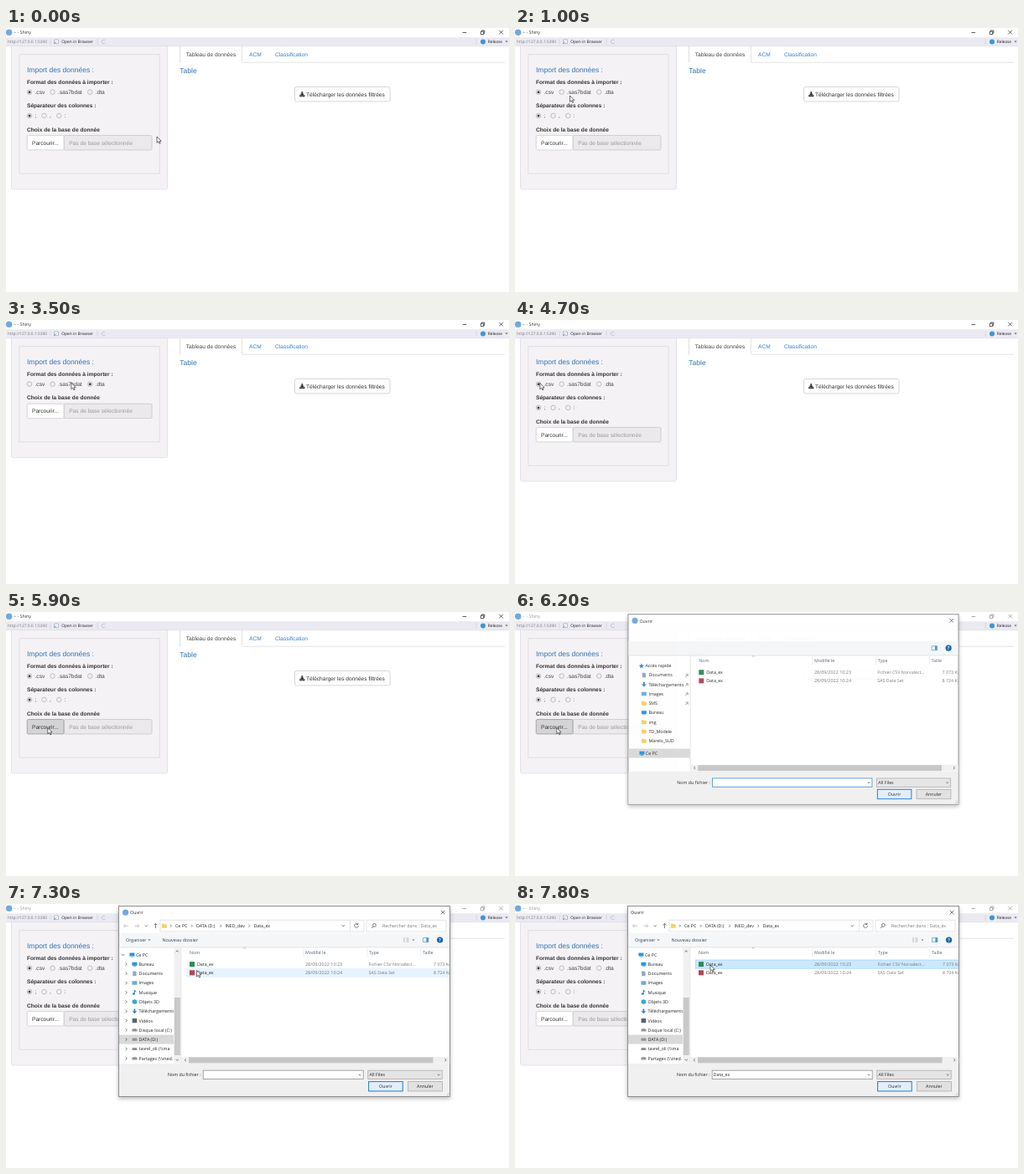
These frames come from a looping animation (600x316 px, 8000 ms). An HTML page:

```html
<!DOCTYPE html>
<html lang="fr">
<head>
<meta charset="utf-8">
<title>Import des données</title>
<style>
html, body { margin: 0; width: 100%; height: 100%; overflow: hidden; background: #fff; }
svg { display: block; width: 600px; height: 316px; text-rendering: geometricPrecision; }
text { white-space: pre; }
.page { font: 6.6px "Liberation Sans", Arial, sans-serif; fill: #444; }
.page .b { font-weight: bold; fill: #333; }
.page .h { font-size: 8.5px; fill: #2f72ae; }
.page .link { fill: #337fc4; }
.page .hint { fill: #999; }
.ui { font: 5.3px "Open Sans", "Noto Sans", sans-serif; fill: #222; }
.bar { font-size: 4.85px; }
.soft { fill: #777; }
.date { font-size: 5.45px; }
.line { fill: none; stroke: #555; stroke-width: .8; }
.thin { fill: none; stroke: #ddd; stroke-width: .8; }
</style>
</head>
<body>
<svg viewBox="0 0 600 316">
  <defs>
    <filter id="shadow" x="-5%" y="-5%" width="110%" height="112%">
      <feDropShadow dx="0" dy="2" stdDeviation="2.5" flood-opacity=".28"/>
    </filter>
    <clipPath id="treeClip"><rect x="135" y="52" width="65.5" height="139"/></clipPath>
    <clipPath id="listClip"><rect x="209" y="52" width="320" height="131"/></clipPath>
  </defs>

  <g class="page">
    <rect id="outer" x="6.5" y="18" width="186" rx="2" fill="#f5f2f6" stroke="#dfdce1" stroke-width=".8"/>
    <rect id="inner" x="15.8" y="31.7" width="167.4" fill="none" stroke="#dcd9df" stroke-width=".8"/>
    <text class="h" x="25" y="53.2">Import des données :</text>
    <text class="b" x="25" y="67">Format des données à importer :</text>
    <g id="formats"></g>
    <g id="sep"><text class="b" x="25" y="95.3">Séparateur des colonnes :</text></g>
    <g id="cat">
      <text class="b" x="25" y="95.3">Avez-vous un catalogue de labels (format</text>
      <text class="b" x="25" y="104.7">.sas7bcat) ?</text>
    </g>
    <g id="base">
      <text class="b" x="25" y="123.6">Choix de la base de donnée</text>
      <rect x="69" y="128.6" width="105" height="17.4" rx="1.5" fill="#ebe9ec" stroke="#c6c4c8" stroke-width=".8"/>
      <text class="hint" x="75.3" y="139.8">Pas de base sélectionnée</text>
      <rect id="browse" x="25.2" y="128.6" width="43.8" height="17.4" rx="1.5" stroke="#ccc" stroke-width=".8"/>
      <text x="31" y="139.8" fill="#333">Parcourir...</text>
    </g>
    <path class="thin" d="M207.5 41.2V20H281.5V41.2H595"/>
    <path d="M207.9 41.2H281.1" stroke="#fff" stroke-width="1"/>
    <path class="thin" d="M207.5 41.6V22"/>
    <text x="214.8" y="34.1">Tableau de données</text>
    <text class="link" x="290" y="34.1">ACM</text>
    <text class="link" x="321" y="34.1">Classification</text>
    <text class="h" x="207.3" y="53.7">Table</text>
    <rect x="344.5" y="70.5" width="113.5" height="17.4" rx="2" fill="#fff" stroke="#ccc" stroke-width=".8"/>
    <path d="M352.4 76.3h1.8v2.4h1.7l-2.6 2.7l-2.6-2.7h1.7zM350.2 80.3h1.5l1.6 1.5l1.6-1.5h1.5v2h-6.2z" fill="#333"/>
    <text x="358" y="81.8" fill="#333">Télécharger les données filtrées</text>
  </g>

  <g class="ui bar">
    <rect width="600" height="11.2" fill="#fff"/>
    <rect y="11.2" width="600" height="10.4" fill="#ebeaf2"/>
    <path d="M0 21.6H600" stroke="#d8d7df" stroke-width=".6"/>
    <circle cx="3.6" cy="5.2" r="3.8" fill="#72a9dc"/>
    <g id="chrome">
      <text x="9" y="7.4" style="font-size:5.3px" fill="currentColor">~ - Shiny</text>
      <path d="M544.5 5.5h4.6M566.3 4.2h3.4v3.4h-3.4zM567.4 4.2v-1.2h3.4v3.4h-1.1M588.3 2.8l4.6 4.6M592.9 2.8l-4.6 4.6" fill="none" stroke="currentColor" stroke-width=".8"/>
    </g>
    <text class="soft" x="2" y="18.2">http://127.0.0.1:5390</text>
    <path d="M53 13v7M109 13v7M561 13v7" stroke="#cfced8" stroke-width=".7"/>
    <path d="M57.5 14h5v4.6h-5z" fill="#fff" stroke="#9aa5b5" stroke-width=".7"/>
    <path d="M57.2 18.8l2.6-2.6" stroke="#4a8ccc" stroke-width=".9"/>
    <text x="66.3" y="18.2">Open in Browser</text>
    <path d="M118.3 14.8a2.3 2.3 0 1 0 .3 2.8" fill="none" stroke="#c2c5cd"/>
    <circle cx="569" cy="16.4" r="3" fill="#3f95d2"/>
    <text x="574.7" y="18.3">Release</text>
    <path d="M595.6 15.6h3l-1.5 1.7z" fill="#555"/>
  </g>

  <g id="dialog" class="ui">
    <rect x="134.5" y="2.5" width="395" height="228" fill="#fff" stroke="#83858b" stroke-width=".9" filter="url(#shadow)"/>
    <circle id="mark" cx="142.6" cy="10.2" r="3.6" fill="#72a9dc"/>
    <text id="caption" y="12.3">Ouvrir</text>
    <path class="line" d="M518.8 7.7l4.6 4.6M523.4 7.7l-4.6 4.6"/>
    <rect x="135" y="34.6" width="394" height="17" fill="#f5f6f7"/>
    <path class="thin" d="M135 51.8H529"/>
    <g id="nav">
      <path class="line" style="stroke:#b5b5b5" d="M146 26.2h-5.4l2-2M140.6 26.2l2 2M153.2 26.2h5.4l-2-2M158.6 26.2l-2 2"/>
      <path class="line" d="M165.8 25.5l1.4 1.4l1.4-1.4M178.4 29v-5.6l-2 2M178.4 23.4l2 2"/>
      <rect class="thin" x="184" y="19.2" width="226.5" height="13.8"/>
      <path class="thin" d="M427 19.2h-16.5M410.5 33H427V19.2"/>
      <path d="M185.8 23.4h2.2l.7.8h3v4.6h-5.9z" fill="#f7cf68"/>
      <g id="crumbs"></g>
      <path class="line" d="M400.8 25.2l1.6 1.6l1.6-1.6M419.7 24.2a2.4 2.4 0 1 0 .8 2M419.9 22.8v1.8h-1.8"/>
      <rect class="thin" x="430" y="19.2" width="95" height="13.8"/>
      <circle class="line" cx="439.4" cy="25.4" r="1.9"/><path class="line" d="M438 26.9l-2 2"/>
      <text class="soft" x="449" y="28">Rechercher dans : Data_ex</text>
      <text x="143" y="45" fill="#24416b">Organiser</text>
      <path d="M169.4 42.4h3l-1.5 1.7z" fill="#555"/>
      <text x="186.4" y="45" fill="#24416b" style="font-size:5.45px">Nouveau dossier</text>
      <path class="line" style="stroke:#aaa" d="M474 41h2M474 43h2M474 45h2M477.5 41h3M477.5 43h3M477.5 45h3"/>
      <path d="M484.6 42.4h2.6l-1.3 1.5z" fill="#555"/>
    </g>
    <path d="M497.5 40.5h6.4v5h-6.4z" fill="#fff" stroke="#5c8fb5" stroke-width=".7"/>
    <path d="M501.3 40.5h2.6v5h-2.6z" fill="#3b9bd6"/>
    <circle cx="517.6" cy="43" r="3.6" fill="#1266b0"/>
    <text x="516.3" y="45" fill="#fff" font-weight="bold">?</text>

    <g clip-path="url(#treeClip)" id="tree"><rect x="135" y="156.6" width="65" height="11" fill="#d9d9d9"/></g>
    <g id="vbar">
      <rect x="200.5" y="52.2" width="7.6" height="138.4" fill="#f0f0f0"/>
      <rect x="200.8" y="112" width="7" height="69" fill="#c9c9c9"/>
      <path class="line" d="M202.6 57.4l1.6-1.6l1.6 1.6M202.6 185.8l1.6 1.6l1.6-1.6"/>
    </g>
    <g id="quick"><rect x="135" y="163.7" width="73.4" height="11" fill="#d9d9d9"/></g>
    <path class="thin" d="M208.8 52V191"/>

    <g clip-path="url(#listClip)">
      <path class="thin" style="stroke:#e8e8e8" d="M354.8 53v10M430.8 53v10M494.8 53v10"/>
      <path class="line" style="stroke:#888;stroke-width:.6" d="M282.6 53.4l1.8-1.4l1.8 1.4"/>
      <rect id="row" x="215.5" width="316" height="10.2" stroke-width=".7"/>
      <g id="files"></g>
    </g>
    <rect x="209.2" y="183" width="320" height="7.8" fill="#f0f0f0"/>
    <rect x="218" y="183.4" width="291.5" height="7" fill="#c5c5c5"/>
    <path class="line" d="M214.8 185.2l-1.6 1.6l1.6 1.6M523.4 185.2l1.6 1.6l-1.6 1.6"/>

    <rect x="135" y="191" width="394" height="39" fill="#f0f0f0"/>
    <text x="193" y="206.3">Nom du fichier :</text>
    <rect id="field" x="235.2" y="199.2" width="191" height="10.4" fill="#fff" stroke-width=".9"/>
    <text id="name" x="236.6" y="206.3">Data_ex</text>
    <rect x="431.8" y="199.2" width="88.4" height="10.4" fill="#e4e4e4" stroke="#adadad" stroke-width=".8"/>
    <text x="433.6" y="206.3">All Files</text>
    <path class="line" d="M420.8 203.8l1.4 1.4l1.4-1.4M514.8 203.8l1.4 1.4l1.4-1.4"/>
    <rect x="432.6" y="212.6" width="40.6" height="11.4" fill="#e3eefa" stroke="#1a7fd4"/>
    <text x="452.9" y="220.2" text-anchor="middle">Ouvrir</text>
    <rect x="479.4" y="212.6" width="41" height="11.4" fill="#e1e1e1" stroke="#adadad" stroke-width=".8"/>
    <text x="499.9" y="220.2" text-anchor="middle">Annuler</text>
    <path d="M527.6 226.4v2.4h-2.4" fill="none" stroke="#b5b5b5" stroke-dasharray="1 .6"/>
  </g>

  <path id="arrow" d="M0 0V7.4L1.8 5.8L3 8.4L4.2 7.9L3 5.4H5.3Z" fill="#fff" stroke="#333" stroke-width=".7"/>
  <path id="resize" d="M-5 0l2.2-2.1v1.4h5.6v-1.4L5 0l-2.2 2.1v-1.4h-5.6v1.4z" fill="#fff" stroke="#333" stroke-width=".6"/>
</svg>

<script>
const LOOP = 8000, TICK = 100;
const $ = id => document.getElementById(id);

function add(parent, tag, attrs, label) {
  const el = document.createElementNS('http://www.w3.org/2000/svg', tag);
  for (const k in attrs) el.setAttribute(k, attrs[k]);
  if (label) el.textContent = label;
  return parent.appendChild(el);
}
const set = (id, attrs) => { for (const k in attrs) $(id).setAttribute(k, attrs[k]); };
const show = (id, on) => { $(id).style.display = on ? '' : 'none'; };

// Row of radio buttons; returns the dots
function radios(parent, y, items, chosen) {
  return items.map(([x, label], i) => {
    add(parent, 'circle', { cx: x, cy: y, r: 2.8, fill: '#f1f0f2', stroke: '#aaa', 'stroke-width': .7 });
    add(parent, 'text', { x: x + 6.5, y: y + 2.3 }, label);
    const dot = add(parent, 'circle', { cx: x, cy: y, r: 1.5, fill: '#444' });
    dot.style.display = i === chosen ? '' : 'none';
    return dot;
  });
}
const formats = radios($('formats'), 76.7, [[28, '.csv'], [55.6, '.sas7bdat'], [100.2, '.dta']], 0);
radios($('sep'), 105, [[28, ';'], [45.5, ','], [63.3, ':']], 0);
radios($('cat'), 114.4, [[28, 'Oui'], [54.2, 'Non']], 1);

// Small sidebar icons by kind
const icons = {
  folder: ['M-2.8-2.4h2.2l.7.8h2.9v4.2h-5.8z', '#f6cd66'],
  star: ['M0-3l.9 2.1l2.2.2l-1.7 1.5l.5 2.2l-1.9-1.2l-1.9 1.2l.5-2.2l-1.7-1.5l2.2-.2z', '#2f8fe0'],
  screen: ['M-3-2.2h6v4h-6zM-1.5 2.2h3v.7h-3z', '#2496dc'],
  page: ['M-2.2-2.8h3.2l1.2 1.2v4.4h-4.4z', '#93a9bd'],
  down: ['M-.9-3h1.8v2.8h2l-2.9 3l-2.9-3h2z', '#2f83d6'],
  image: ['M-3-2.3h6v4.6h-6z', '#69aed8'],
  note: ['M-.6-3h1c.2 1.4 1.8 1.5 1.6 3c-.6-.9-1.2-1-1.6-1v2.6a1.5 1.2 0 1 1-1-1z', '#2c7fd0'],
  cube: ['M0-3l2.8 1.4v3.2l-2.8 1.4l-2.8-1.4v-3.2z', '#37a9cf'],
  film: ['M-2.8-2.6h5.6v5.2h-5.6z', '#59636e'],
  disk: ['M-3-.4l1-1.2h4l1 1.2v2h-6z', '#8d959c']
};
function entry(parent, kind, x, y, label, tx) {
  const [d, fill] = icons[kind];
  add(parent, 'path', { d, fill, transform: `translate(${x} ${y})` });
  add(parent, 'text', { x: tx, y: y + 1.9 }, label);
}

const pins = [];
[['star', 'Accès rapide'], ['page', 'Documents', 1], ['down', 'Téléchargements', 1], ['image', 'Images', 1],
 ['folder', 'SMS', 1], ['screen', 'Bureau'], ['folder', 'img'], ['folder', 'TD_Modele'], ['folder', 'Marelo_SUD']
].forEach(([kind, label, pin], i) => {
  const y = 64.2 + i * 11.25;
  entry($('quick'), kind, i ? 153.4 : 150.4, y, label, i ? 159 : 155);
  if (pin) add($('quick'), 'path', { d: `M203 ${y + 2}l1.5-1.5m-.9-1.7l2.6 2.4m-1.6-3l2.2 2`, class: 'line', style: 'stroke:#777' });
});
entry($('quick'), 'screen', 151, 169.2, 'Ce PC', 155.4);

const chevrons = add($('tree'), 'g', { class: 'line' });
[['screen', 'Ce PC'], ['screen', 'Bureau'], ['page', 'Documents'], ['image', 'Images'], ['note', 'Musique'],
 ['cube', 'Objets 3D'], ['down', 'Téléchargements'], ['film', 'Vidéos'], ['disk', 'Disque local (C:)'],
 ['disk', 'DATA (D:)'], ['disk', 'tavrel_oli (\\\\ma'], ['disk', 'Partages (\\\\ined.']
].forEach(([kind, label], i) => {
  const y = 60.7 + i * 11.28;
  entry($('tree'), kind, i ? 153.4 : 150.4, y, label, i ? 158.6 : 155);
  add(chevrons, 'path', { d: i ? `M142.6 ${y - 1.7}l1.7 1.7l-1.7 1.7` : `M138 ${y - .8}l1.7 1.7l1.7-1.7` });
});

[[202, 'Ce PC'], [227, 'DATA (D:)'], [261.4, 'INED_dev'], [295.4, 'Data_ex']].forEach(([x, label]) => {
  add($('crumbs'), 'path', { d: `M${x - 6} 24.8l1.4 1.4l-1.4 1.4`, class: 'line' });
  add($('crumbs'), 'text', { x, y: 28 }, label);
});

const cols = [219, 357, 433, 497];
['Nom', 'Modifié le', 'Type', 'Taille'].forEach((label, i) =>
  add($('files'), 'text', { x: cols[i], y: 60, fill: '#51617a' }, label));
[['#2f8a57', '28/09/2022 10:23', 'Fichier CSV Norvalect...', '7 073 Ko'],
 ['#b0475a', '28/09/2022 10:24', 'SAS Data Set', '8 724 Ko']].forEach(([fill, date, type, size], i) => {
  const y = 74 + i * 10.2, g = $('files');
  add(g, 'rect', { x: 219, y: y - 4.9, width: 6, height: 6, fill });
  add(g, 'text', { x: 228, y }, 'Data_ex');
  add(g, 'text', { x: cols[1], y, class: 'soft date' }, date);
  add(g, 'text', { x: cols[2] - .4, y, class: 'soft' }, type);
  add(g, 'text', { x: 510, y, class: 'soft' }, size);
});

// Pointer stops: time, x, y
const stops = [
  [0, 180, 130], [1000, 65.5, 81], [1300, 56, 75], [1900, 56, 75], [2400, 101.3, 74], [2600, 101.3, 74],
  [2800, 102, 75], [3300, 102, 75], [3800, 33.5, 76], [3900, 33.5, 76], [4100, 29.8, 75.5], [4900, 29.8, 75.5],
  [5500, 49.8, 138.5], [6500, 49.8, 138.5], [6900, 209, 90], [7100, 222, 86], [7500, 233, 73], [LOOP, 233, 73]
];
function pointer(t) {
  const i = stops.findIndex(s => s[0] > t);
  const [t0, x0, y0] = stops[i - 1], [t1, x1, y1] = stops[i];
  const p = (t - t0) / (t1 - t0), e = p * p * (3 - 2 * p);
  return [x0 + (x1 - x0) * e, y0 + (y1 - y0) * e];
}

// Form layout per format: shift of the file picker
const shifts = [0, 9.4, -28.3];

function draw(t) {
  const [x, y] = pointer(t);
  const format = t < 1600 || t >= 4700 ? 0 : t < 3000 ? 1 : 2;
  const shift = shifts[format];
  formats.forEach((dot, i) => { dot.style.display = i === format ? '' : 'none'; });
  show('sep', format === 0);
  show('cat', format === 1);
  set('base', { transform: `translate(0 ${shift})` });
  set('inner', { height: 142.5 + shift });
  set('outer', { height: 175 + shift });

  const pressed = t >= 5800 && t < 6600;
  const hover = t >= 5400 && t < 5800;
  set('browse', { fill: pressed ? '#d4d3d5' : hover ? '#e6e6e6' : '#fff', stroke: pressed ? '#999' : '#ccc' });

  const open = t >= 6100, loaded = t >= 6500;
  $('chrome').style.color = open ? '#999' : '#333';
  show('dialog', open);
  const grow = t < 6200 ? .97 : t < 6300 ? .9975 : 1;
  set('dialog', {
    opacity: t < 6200 ? .45 : t < 6300 ? .96 : 1,
    transform: `translate(332 116.5) scale(${grow}) translate(-332 -116.5)`
  });
  show('nav', t >= 6400);
  show('quick', !loaded);
  show('tree', loaded);
  show('vbar', loaded);
  show('mark', t < 7500);
  set('caption', { x: t < 7500 ? 148 : 138 });
  chevrons.style.display = t >= 6700 && t < 7500 ? '' : 'none';
  set('field', { stroke: loaded ? '#9a9a9a' : '#4a97d8' });

  const picked = t >= 7700, over = loaded && x > 216 && y > 67 && y < 87;
  show('row', picked || over);
  set('row', {
    y: picked || y < 77 ? 67 : 77.2,
    fill: picked ? '#cce8ff' : '#e5f3ff',
    stroke: picked ? '#99d1ff' : '#e5f3ff'
  });
  show('name', picked);

  const edge = loaded && Math.abs(x - 209) < 2;
  show('arrow', !edge);
  show('resize', edge);
  set(edge ? 'resize' : 'arrow', { transform: `translate(${x} ${y})` });
}

const start = performance.now();
function frame() {
  const t = (performance.now() - start) % LOOP;
  draw(Math.floor(t / TICK) * TICK);
  requestAnimationFrame(frame);
}
frame();
</script>
</body>
</html>
```
